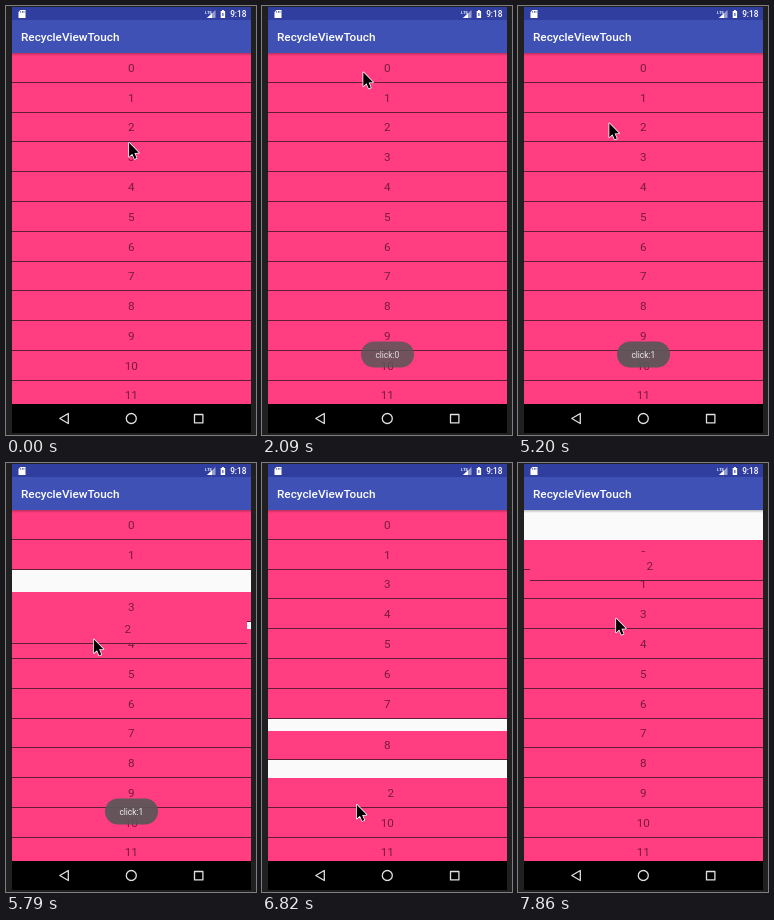
Recreate the animation shown at these times as an HTML page with a canvas. Size 250 by 429 pixels, loop 8000 ms.

```html
<!DOCTYPE html>
<html lang="en">
<head>
<meta charset="utf-8">
<title>RecycleViewTouch</title>
<style>
  html, body { margin: 0; width: 100%; height: 100%; overflow: hidden; background: #202021; }
  canvas { display: block; width: 250px; height: 429px; }
</style>
</head>
<body>
<canvas></canvas>
<script>
const W = 250, H = 429, LOOP = 8000;
const TICK = 148.1;
const LEFT = 6, RIGHT = 245, WIDTH = RIGHT - LEFT;
const LIST_TOP = 47, LIST_BOTTOM = 398, LIST_H = LIST_BOTTOM - LIST_TOP;
const ROWS = 12, ROW_BASE = 46.65, ROW_H = 29.77;
const DRAGGED = 2, LAST_PASSED = 9, DRAG_LAG = 0.55, MOVE_TICKS = 1.69;
const REST = { x: 122.8, y: 136 }, GRAB = { x: 91, y: 116.5 };

// Pointer strokes in ticks; bow bends the stroke to the left
const STROKES = [
  { from: 2, to: 9, x: 101, y: 65.5 },
  { from: 15, to: 18, x: 97.6, y: 87 },
  { from: 23.5, to: 28, ...GRAB },
  { from: 35.3, to: 44, x: 94.5, y: 270, bow: 5 },
  { from: 43.5, to: 46.5, x: 94.5, y: 346 },
  { from: 46.5, to: 50.7, x: 97, y: 46 },
  { from: 51.6, to: 53.6, x: 98, y: 183 }
];

const canvas = document.querySelector('canvas');
const scale = window.devicePixelRatio || 1;
canvas.width = W * scale;
canvas.height = H * scale;
const ctx = canvas.getContext('2d');
ctx.scale(scale, scale);

const clamp01 = v => Math.min(1, Math.max(0, v));
const ease = p => (1 - Math.cos(Math.PI * p)) / 2;
const moved = (tick, start) => ease(clamp01((tick - start) / MOVE_TICKS));

function rect(x, y, w, h, color) {
  ctx.fillStyle = color;
  ctx.fillRect(x, y, w, h);
}

function text(str, x, y, size, color, align = 'center', weight = 400) {
  ctx.font = `${weight} ${size}px Roboto, sans-serif`;
  ctx.textAlign = align;
  ctx.fillStyle = color;
  ctx.fillText(str, x, y);
}

function polygon(points, fill) {
  ctx.beginPath();
  points.forEach(([x, y]) => ctx.lineTo(x, y));
  ctx.closePath();
  if (fill) {
    ctx.fillStyle = fill;
    ctx.fill();
  }
}

function pointerAt(tick) {
  let { x, y } = REST;
  for (const s of STROKES) {
    const p = clamp01((tick - s.from) / (s.to - s.from));
    x += (s.x - x) * ease(p) - (s.bow || 0) * Math.sin(Math.PI * p);
    y += (s.y - y) * ease(p);
  }
  return { x, y };
}

// Rows make way one after another as the dragged row passes down, then up again
function slotOf(row, tick) {
  if (row > LAST_PASSED) return row;
  const up = row > DRAGGED ? moved(tick, 38.45 + 1.32 * (row - DRAGGED - 1)) : 0;
  const back = moved(tick, 48.55 + 0.2 * (LAST_PASSED - row));
  return row - up + back;
}

function drawRow(row, slot, dx = 0, dy = 0) {
  const y = ROW_BASE + slot * ROW_H + dy;
  const top = Math.floor(y) + 1, line = Math.floor(y + ROW_H);
  const x = LEFT + Math.round(dx);
  rect(x, top, WIDTH, line + 1 - top, '#ff3d80');
  rect(x, line, WIDTH, 1, '#611c38');
  text(row, 125.3 + dx, Math.round(y + 19.3), 11.7, 'rgba(0,0,0,.54)');
}

function drawList(tick) {
  ctx.save();
  ctx.beginPath();
  ctx.rect(LEFT, LIST_TOP, WIDTH, LIST_H);
  ctx.clip();
  rect(LEFT, LIST_TOP, WIDTH, LIST_H, '#fafafa');
  for (let row = 0; row < ROWS; row++) {
    if (row !== DRAGGED) drawRow(row, slotOf(row, tick));
  }
  const hand = tick < STROKES[3].from ? GRAB : pointerAt(tick - DRAG_LAG);
  drawRow(DRAGGED, DRAGGED, hand.x - GRAB.x, hand.y - GRAB.y);
  const shadow = ctx.createLinearGradient(0, LIST_TOP, 0, LIST_TOP + 3);
  shadow.addColorStop(0, 'rgba(0,0,0,.25)');
  shadow.addColorStop(1, 'rgba(0,0,0,0)');
  rect(LEFT, LIST_TOP, WIDTH, 3, shadow);
  ctx.restore();
}

function drawBars() {
  rect(LEFT, 1, WIDTH, 13, '#303f9f');
  rect(LEFT, 14, WIDTH, LIST_TOP - 14, '#3f51b5');
  text('RecycleViewTouch', 15, 35, 11.75, '#fff', 'left', 500);

  // memory card
  polygon([[14.5, 4], [19.5, 4], [19.5, 12], [12.5, 12], [12.5, 6]], '#fff');
  for (let x = 14.4; x < 18; x += 1.6) rect(x, 5, 0.7, 1.8, '#303f9f');

  // signal, battery, clock
  polygon([[201, 12], [209.5, 12], [209.5, 4]], 'rgba(255,255,255,.5)');
  polygon([[201, 12], [206, 12], [206, 7.3]], '#fff');
  text('LTE', 199, 7.5, 4.4, '#fff', 'left', 500);
  rect(214.7, 5, 4.4, 7, '#fff');
  rect(216, 4, 1.8, 1, '#fff');
  rect(216.4, 7, 1, 3, '#303f9f');
  text('9:18', 240.5, 11.3, 8.3, '#fff', 'right', 500);

  // navigation
  rect(LEFT, LIST_BOTTOM, WIDTH, 29, '#000');
  ctx.strokeStyle = '#e0e0e0';
  ctx.lineWidth = 1.3;
  ctx.lineJoin = 'round';
  polygon([[53.8, 412.5], [62.3, 407.5], [62.3, 417.5]]);
  ctx.stroke();
  ctx.beginPath();
  ctx.arc(125.3, 412.5, 5, 0, 2 * Math.PI);
  ctx.stroke();
  ctx.strokeRect(188.5, 408.5, 8.4, 8.4);
}

function drawToast(tick) {
  const alpha = clamp01((tick - 11) / 3.3) * clamp01((42 - tick) / 1.7);
  if (!alpha) return;
  ctx.globalAlpha = alpha;
  ctx.beginPath();
  ctx.roundRect(99, 335.5, 53, 26, 13);
  ctx.fillStyle = 'rgba(88,86,86,.92)';
  ctx.fill();
  text(tick < 25 ? 'click:0' : 'click:1', 125.3, 352, 8.4, '#ececec');
  ctx.globalAlpha = 1;
}

function drawPointer({ x, y }) {
  ctx.save();
  ctx.translate(x + 0.3, y + 0.8);
  ctx.scale(0.9, 0.9);
  polygon([[0, 0], [0, 15.4], [3.5, 12.2], [6, 18], [8.3, 17], [5.9, 11.3], [10.8, 11.1]], '#000');
  ctx.lineJoin = 'round';
  ctx.lineWidth = 1.7;
  ctx.strokeStyle = '#fff';
  ctx.stroke();
  ctx.fill();
  ctx.restore();
}

function frame(now) {
  const tick = Math.floor((now % LOOP) / TICK);
  rect(0, 0, W, H, '#202021');
  drawList(tick);
  drawBars();
  drawToast(tick);
  drawPointer(pointerAt(tick));
  requestAnimationFrame(frame);
}
requestAnimationFrame(frame);
</script>
</body>
</html>
```
